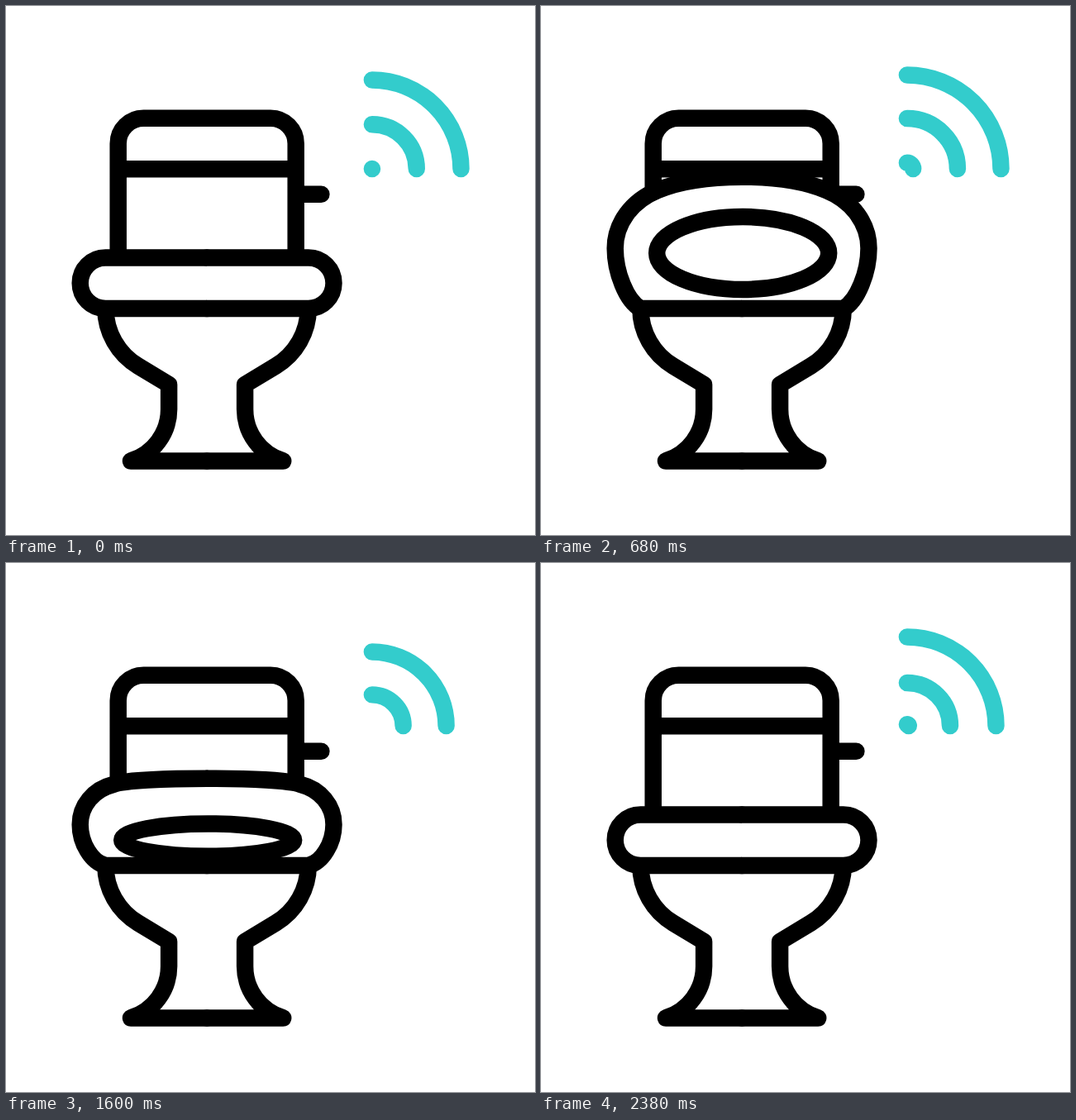
An HTML page that plays this animation: 640x640 px, repeating every 2.4 s.

```html
<!DOCTYPE html>
<html lang="en">
<head>
<meta charset="utf-8">
<title>Smart toilet</title>
<style>
  html, body { margin: 0; width: 100%; height: 100%; overflow: hidden; background: #fff; }
  svg { display: block; width: 100%; height: 100%; }
  path, ellipse { fill: none; stroke: #000; stroke-width: 20.48; stroke-linecap: round; stroke-linejoin: round; }
  #lid { fill: #fff; }
  #waves { stroke: #3cc; }
</style>
</head>
<body>
<svg viewBox="0 0 640 640">
  <path d="M135.7 304.6V166.4a30.7 30.7 0 0 1 30.7-30.7H320a30.7 30.7 0 0 1 30.7 30.7V304.6M135.7 197.2H350.7M350.7 227.8H381.4"/>
  <g id="half">
    <path d="M120.4 366A81.4 81.4 0 0 0 160 435.6L197.1 458V488A65.4 65.4 0 0 1 151 550.4H243.1"/>
    <path id="lid"/>
  </g>
  <use href="#half" transform="translate(486.2) scale(-1 1)"/>
  <ellipse id="hole" cx="244.2" rx="104"/>
  <path id="waves"/>
</svg>
<script>
const LOOP = 2400;
const WAVE_GAP = 600;
const WAVE_LIFE = 1350;
const [lid, hole, waves] = ['lid', 'hole', 'waves'].map(id => document.getElementById(id));

// cubic-bezier(.076, 0, .48, 1), solved by bisection
function ease(x) {
  x = Math.min(1, Math.max(0, x));
  let lo = 0, hi = 1;
  for (let i = 0; i < 24; i++) {
    const s = (lo + hi) / 2, u = 1 - s;
    if (3 * s * u * u * 0.076 + 3 * s * s * u * 0.48 + s * s * s < x) lo = s;
    else hi = s;
  }
  return lo * lo * (3 - 2 * lo);
}

// Left half of the lid: a flat pill when p = 0, raised when p = 1.
function lidPath(p) {
  const mix = (closed, open) => closed + (open - closed) * p;
  const top = mix(304.6, 197), side = mix(335.3, 289);
  const shoulder = `${mix(120.4, 143)} ${mix(304.6, 215)}`;
  return `M243.1 ${top}
    C${mix(181.7, 207.3)} ${top} ${mix(120.4, 171.5)} ${mix(304.6, 203)} ${shoulder}
    C${mix(103.4, 110)} ${mix(304.6, 229)} 89.7 ${mix(318.3, 258)} 89.7 ${side}
    C89.7 ${mix(352.3, 319)} 103.4 ${mix(366, 356)} 120.4 366H243.1`;
}

function wavePath(age) {
  const r = Math.max(0.01, Math.min(age * 0.0896, 17.5 + age * 0.075));
  return `M442.9 ${197.1 - r}A${r} ${r} 0 0 1 ${442.9 + r} 197.1`;
}

function draw(t) {
  const p = t < 1200 ? ease(t / 940) : 1 - ease((t - 1200) / 1000);
  lid.setAttribute('d', lidPath(p));
  hole.setAttribute('cy', 364.5 - 72 * p);
  hole.setAttribute('ry', 48.3 * p);
  hole.style.visibility = p > 0.1 ? 'visible' : 'hidden';

  let d = '';
  for (let n = -2; n <= 4; n++) {
    // every second wave leaves a little early
    const lead = n % 2 ? 0 : 10 * Math.max(0, n);
    const age = t - n * WAVE_GAP + lead;
    if (age >= 0 && age < WAVE_LIFE) d += wavePath(age);
  }
  waves.setAttribute('d', d);
}

const start = performance.now();
function tick() {
  draw((performance.now() - start) % LOOP);
  requestAnimationFrame(tick);
}
tick();
</script>
</body>
</html>
```
